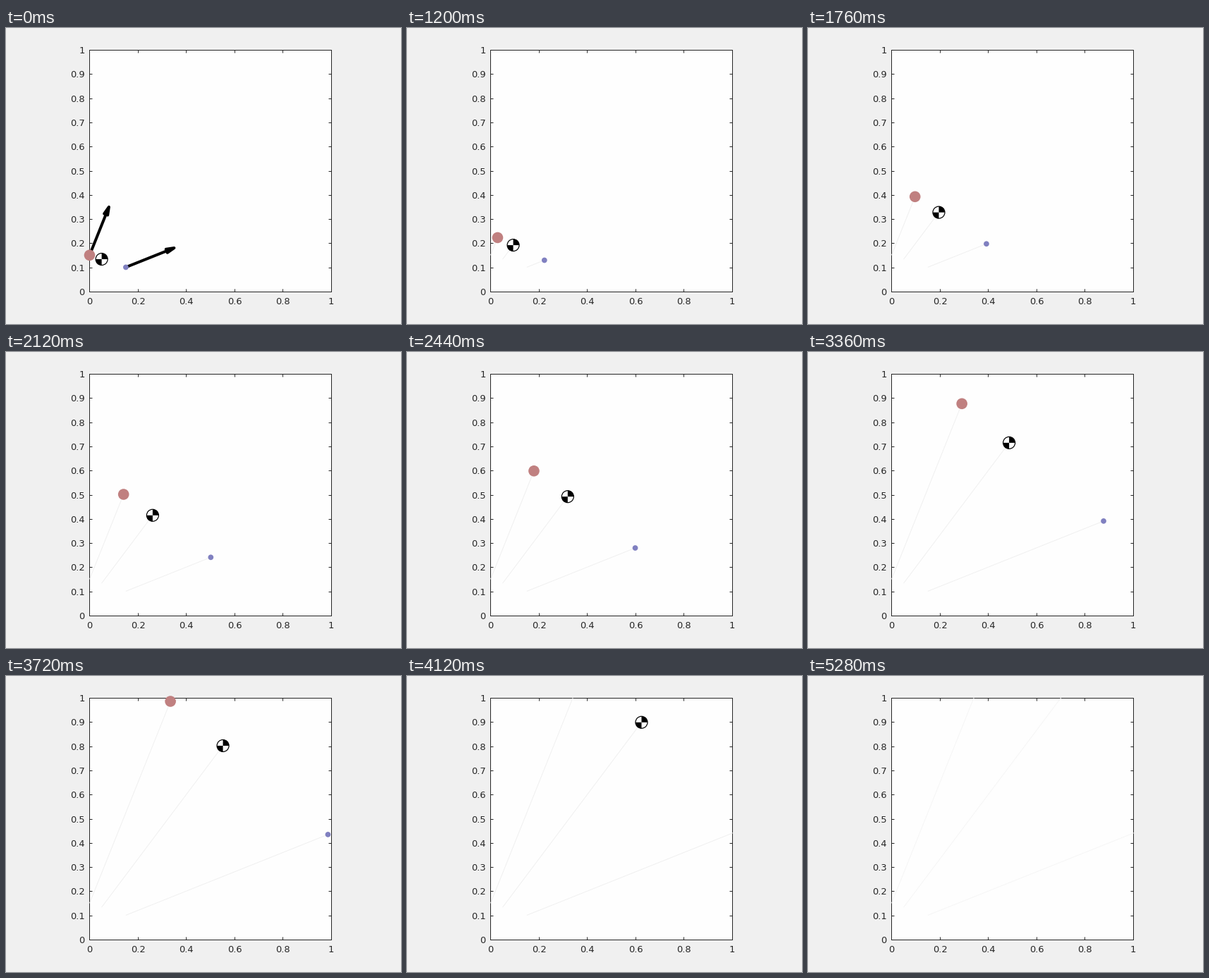
A matplotlib script that plays this animation: 560 by 420 pixels, repeating every 5600 ms.

```python
import numpy as np
import matplotlib.pyplot as plt
from matplotlib.animation import FuncAnimation
from matplotlib.patches import Circle, Polygon, Rectangle, Wedge

W, H, DPI = 560, 420, 100
PX = 72 / DPI  # points per pixel
LEFT, RIGHT, TOP, BOTTOM = 118.5, 461.5, 31.5, 374.5
INK = "#262626"
FRAMES, START, FADE = 140, 24, 132

plt.rcParams["font.family"] = "DejaVu Sans"
fig = plt.figure(figsize=(W / DPI, H / DPI), dpi=DPI, facecolor="#f0f0f0")
ax = fig.add_axes([0, 0, 1, 1])
ax.set_xlim(0, W)
ax.set_ylim(H, 0)
ax.axis("off")


def to_px(point):
    x, y = point
    return np.array([LEFT + x * 342.6, 373.7 - y * 342.4])


def line(xs, ys, width=1, color=INK, **kw):
    kw.setdefault("solid_capstyle", "butt")
    return ax.plot(xs, ys, color=color, lw=width * PX, snap=False, **kw)[0]


def label(x, y, value, ha):
    ax.text(x, y, f"{value:g}", size=13 * PX, color=INK, ha=ha, va="center_baseline")


def draw_box():
    ax.add_patch(Rectangle((LEFT, TOP), RIGHT - LEFT, BOTTOM - TOP,
                           fc="#fefefe", ec="none", snap=False, zorder=0))
    line([LEFT, RIGHT, RIGHT, LEFT, LEFT], [TOP, TOP, BOTTOM, BOTTOM, TOP],
         zorder=1, solid_capstyle="projecting", solid_joinstyle="miter")
    for i in range(11):
        y = np.floor(BOTTOM - 34.3 * i) + 0.5
        for edge, inward in ((LEFT, 4), (RIGHT, -4)):
            line([edge, edge + inward], [y, y], zorder=1)
        label(111.6, y - 0.5, i / 10, "right")
        if i % 2 == 0:
            x = np.floor(LEFT + 34.3 * i) + 0.5
            for edge, inward in ((TOP, 4), (BOTTOM, -4)):
                line([x, x], [edge, edge + inward], zorder=1)
            label(x - 0.5, 386.9, i / 10, "center")


def arrow(start, velocity):
    tail, tip = to_px(start), to_px(start + velocity)
    along = (tip - tail) / np.hypot(*(tip - tail))
    across = np.array([-along[1], along[0]])
    back = tip - 11.5 * along
    shaft = line(*zip(tail, tip - 3 * along), width=4, color="black", zorder=3)
    head = Polygon([back + 2.7 * across, tip, back - 2.7 * across], fc="black", ec="black",
                   lw=4 * PX, joinstyle="round", zorder=3)
    ax.add_patch(head)
    return [shaft, head]


draw_box()
inside = Rectangle((LEFT - 0.5, TOP - 0.5), RIGHT - LEFT + 1, BOTTOM - TOP + 1, transform=ax.transData)

# Start and velocity of the heavy body, the light body and their mass centre
starts = np.array([[0, 0.15], [0.15, 0.1], [0.05, 0.4 / 3]])
velocities = np.array([[0.08, 0.2], [0.2, 0.08], [0.12, 0.16]])

trails = [line([], [], width=0.9, zorder=2) for _ in starts]
arrows = arrow(starts[0], velocities[0]) + arrow(starts[1], velocities[1])
bodies = [Circle((0, 0), 7.8, fc="#c08080", zorder=4),
          Circle((0, 0), 3.85, fc="#8080c0", zorder=4)]
# The y axis points down: these wedges fill the upper right and lower left
disc = Circle((0, 0), 8.5, fc="white", ec="black", lw=1.2 * PX, zorder=5)
wedges = [Wedge((0, 0), 8.5, a, a + 90, fc="black", lw=0, zorder=6) for a in (-90, 90)]
centre = [disc] + wedges
for patch in bodies + centre:
    ax.add_patch(patch)
for item in trails + centre:
    item.set_clip_path(inside)


def update(frame):
    t = np.clip(frame - START, 0, 99) * 6 / 99
    now = starts + velocities * t
    for item in arrows:
        item.set_visible(frame < START)
    for trail, a, b in zip(trails, starts, now):
        trail.set_data(*zip(to_px(a), to_px(b)))
        trail.set_visible(frame > START)
        trail.set_color("#efefef" if frame < FADE else "#f5f5f5")
    for body, p in zip(bodies, now):
        body.center = to_px(p)
        body.set_visible(p.max() <= 1)
    mid = to_px(now[2])
    disc.center = mid
    for wedge in wedges:
        wedge.set_center(mid)
    for part in centre:
        part.set_visible(now[2][1] < 1.03)
    return trails + arrows + bodies + centre


anim = FuncAnimation(fig, update, frames=FRAMES, interval=40, repeat=True, repeat_delay=0, blit=False)
plt.show()
```
